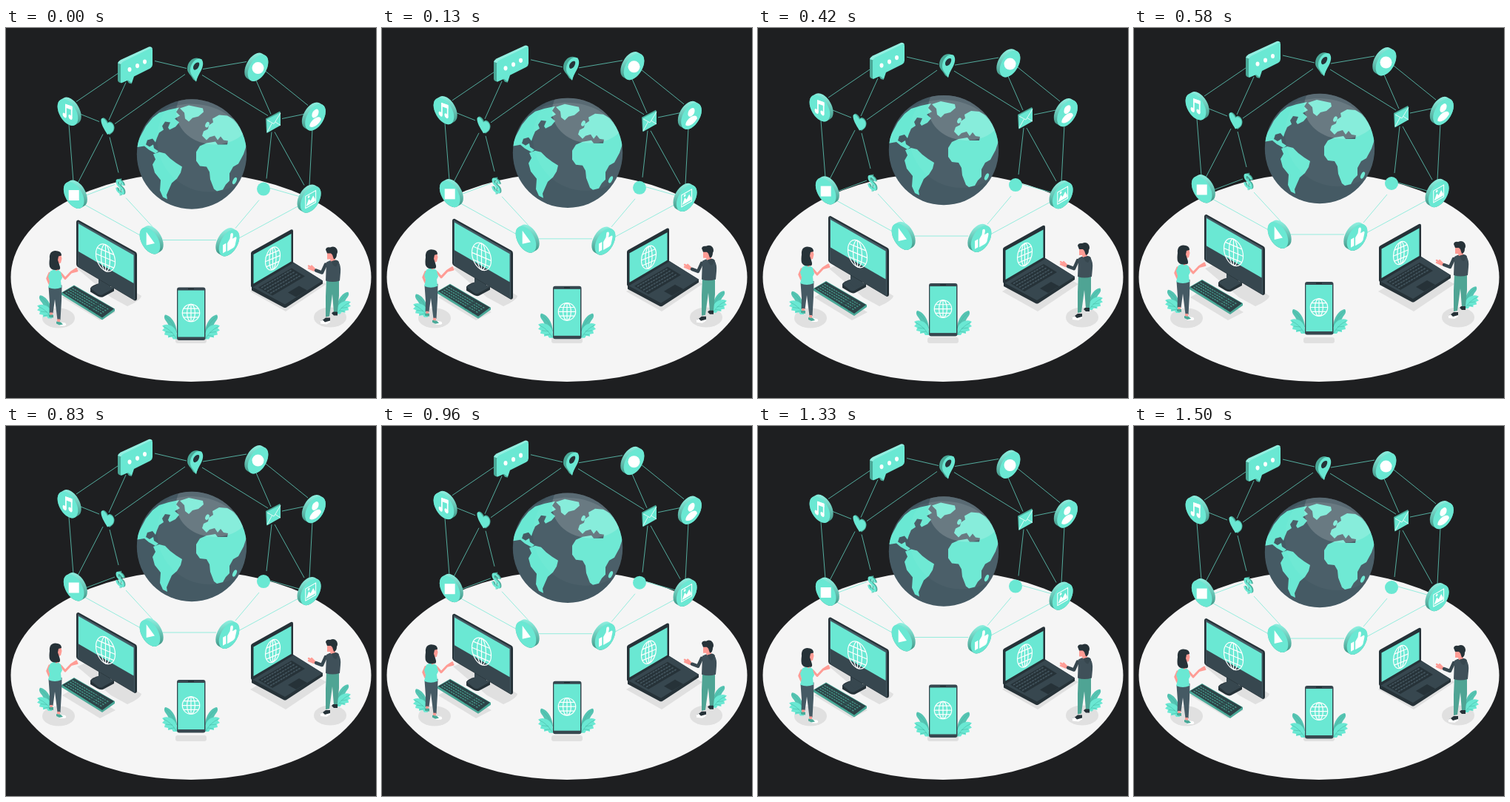
These frames come from a looping animation (500 px wide and 500 px high, 1540 ms). An HTML page:

```html
<!DOCTYPE html>
<html lang="en">
<head>
<meta charset="utf-8">
<title>Connected world</title>
<style>
  html, body { margin: 0; height: 100%; overflow: hidden; background: #1e1f21; }
  svg { display: block; width: 100vw; height: 100vh; }
  .teal { fill: #6ae8d3; }
  .shade { fill: #4aa998; }
  .slate { fill: #455a64; }
  .dark { fill: #37474f; }
  .ink { fill: #263238; }
  .skin { fill: #ff9c95; }
  .white { fill: #fff; }
  .shadow { fill: #e0e0e0; }
  .line { fill: none; stroke: #6ae8d3; stroke-width: .7; }
  .pen { fill: none; stroke: #fff; stroke-width: 1.2; stroke-linejoin: round; }
  #web * { vector-effect: non-scaling-stroke; }
  .vein { fill: none; stroke: #3fae9c; stroke-width: .5; }
  .limb { fill: none; stroke-linecap: round; stroke-linejoin: round; }
</style>
</head>
<body>
<svg viewBox="0 0 500 500">
  <defs>
    <linearGradient id="rim" gradientUnits="userSpaceOnUse" x1="0" y1="-20" x2="-8" y2="8">
      <stop stop-color="#8cefdf"/><stop offset="1" stop-color="#469c8d"/>
    </linearGradient>
    <clipPath id="earth"><circle cx="251" cy="170" r="74.2"/></clipPath>
    <g id="coin">
      <path d="M0 0L-5-5" stroke="url(#rim)" stroke-width="32" stroke-linecap="round"/>
      <circle class="teal" r="16"/>
    </g>
    <g id="web" class="pen">
      <circle r="10"/><ellipse rx="4.6" ry="10"/>
      <path d="M0-10V10M-10 0H10M-8.600-5H8.600M-8.600 5H8.600"/>
    </g>
    <g id="plant">
      <path fill="#55c4b2" d="M0-8C0-19 7-32 16-33C19-29 15-25 13-22C10-15 4-13 0-8Z"/>
      <path class="vein" d="M1-10Q6-24 16-31"/>
      <path class="teal" d="M0 0C-1-10 3-17 10-19Q16-21 20-18L17-15L20-12L16-10L17-6L12-5V-2L7-3L5 0Z"/>
      <path class="vein" d="M1-1Q7-12 18-17M6-9L15-10M4-5L11-4"/>
    </g>
  </defs>

  <ellipse cx="250" cy="336.700" rx="243.500" ry="141.200" fill="#f5f5f5"/>
  <g class="shadow">
    <ellipse cx="71" cy="392" rx="22" ry="13.500"/>
    <ellipse cx="438" cy="391" rx="22" ry="13.500"/>
    <rect x="229" y="418" width="42" height="8" rx="3"/>
    <path d="M96 325L113 318L183 362Q182 368 164 376L142 364Z"/>
    <path d="M76 364L94 353L148 384L127 395Z"/>
    <path d="M330 356L390 321L433 346L378 383Z"/>
  </g>

  <g id="float">
    <path class="line" d="M151 61L95 99M162 73L139 124M201 44L244 54M266 55L325 45M242 62L147 129
      M265 63L354 118M351 58L408 104M337 68L358 116M373 122L402 116M359 140L352 203M363 140L403 212
      M414 136L410 212M101 116L126 126M85 130L91 207M131 143L97 209M140 147L152 195M107 226L147 211
      M106 238L182 280M162 229L198 268M212 286H284M310 270L342 232M312 285L397 239M357 216L396 227"/>

    <!-- Earth -->
    <g clip-path="url(#earth)">
      <circle class="slate" cx="251" cy="170" r="75"/>
      <g class="teal">
        <path d="M175 161L181 147L189 132L198 121L207 114L220 110L234 107L230 113L235 118L228 122L234 127L229 133L221 137L219 134L222 127L215 126L211 132L213 137L207 141L204 148L202 154L198 149L191 151L189 157L194 160L199 157L200 162L206 166L202 169L193 164L187 159Z"/>
        <path d="M235 108L247 104L266 108L267 113L260 119L252 121L247 126L242 122L241 114Z"/>
        <path d="M199 170L207 167L215 169L222 176L230 182L238 187L236 195L231 203L224 209L220 218L217 225L218 231L212 228L208 219L209 205L201 195L198 184L202 177Z"/>
        <path d="M265 145L267 139L273 136L274 131L280 127L279 122L288 117L299 118L308 123L317 132L328 150L325 158L321 170L314 183L307 187L302 196L302 206L297 211L293 218L285 220L281 217L276 204L275 194L271 187L262 186L257 179L257 167L262 159L271 155L283 153L286 157L299 157L300 152L294 151L290 146L286 151L282 145L275 147L271 151Z"/>
        <ellipse cx="309" cy="206" rx="2.400" ry="5" transform="rotate(25 309 206)"/>
        <ellipse cx="272" cy="130" rx="2.500" ry="4" transform="rotate(25 272 130)"/>
      </g>
      <circle class="white" cx="275" cy="150" r="71" opacity=".03"/>
      <ellipse class="white" cx="282" cy="113" rx="52" ry="44" opacity=".17"/>
      <path class="dark" d="M177 96H330V170Q316 102 246 102Q204 106 177 130Z" opacity=".3"/>
    </g>

    <!-- Chat bubble -->
    <path class="shade" d="M151 48Q151 45 154 44L158 48L156 74L153 73Q151 72 151 70Z"/>
    <path fill="#93efe1" d="M151 47Q152 44 155 42.500L193 25Q196 24 198 27L157 49Z"/>
    <path class="shade" d="M162 68L166 74L170 75L168 66Z"/>
    <path class="teal" d="M155 50Q155 47 158 45L194 27.500Q198 25.500 198 29V49Q198 52 195 54L173 65L170 74L165 70L158 73Q155 75 155 72Z"/>
    <g class="white">
      <ellipse cx="167" cy="55.500" rx="2.500" ry="3.100"/><ellipse cx="177.500" cy="50.500" rx="2.500" ry="3.100"/><ellipse cx="187.500" cy="45" rx="2.500" ry="3.100"/>
    </g>

    <!-- Map pin -->
    <path class="shade" d="M245 55C245 46 251 40 258 40L265 42L257 72L253 69C250 63 245 60 245 55Z"/>
    <path class="teal" d="M249 57C249 49 254 42 260 41C265 40 267 45 266 50C265 57 259 63 257 72C254 66 249 63 249 57Z"/>
    <path class="ink" d="M253 53C253 57 256 57 259 54C262 50 262 45 259 46C256 46 253 50 253 53Z"/>

    <!-- Heart and envelope -->
    <g transform="matrix(.95 .5 0 1.050 137 134)">
      <path class="shade" d="M2 9C-4 4-9 0-9-5C-9-10-3-11 0-6C3-11 9-9 9-4C9 1 6 5 2 9Z" transform="translate(1 -1)"/>
      <path class="teal" d="M0 9C-5 4-9 0-9-5C-9-10-3-10 0-5C3-10 9-9 9-4C9 1 5 5 0 9Z"/>
    </g>
    <path class="shade" d="M351 122L370 112L371 114L353 141L352 140Z"/>
    <path class="teal" d="M352.500 123L371 113.500V131L352.500 141.500Z"/>
    <path class="pen" style="stroke-width:.8" d="M353 124L362 129L371 114.500M353 140L359.500 128M371 131L364 126.500"/>

    <!-- Dollar sign and round badge -->
    <g font-family="Liberation Sans, Arial, sans-serif" font-weight="700" font-size="28" text-anchor="middle">
      <text class="shade" transform="matrix(.8 .45 0 1 155.500 223.500)">$</text>
      <text class="teal" transform="matrix(.8 .45 0 1 154 224)">$</text>
    </g>
    <circle class="teal" cx="348" cy="217" r="9"/>

    <!-- Coins facing left -->
    <use href="#coin" transform="matrix(-.866 -.5 0 1 83.500 113.500)"/>
    <g transform="matrix(.866 .5 0 1 83.500 113)">
      <path class="pen" style="stroke-width:2" d="M-3 7V-8L6-10V5"/>
      <path class="white" d="M-4-9L7-11V-6L-4-4Z"/>
      <circle class="white" cx="-5" cy="7" r="3"/><circle class="white" cx="4" cy="5" r="3"/>
    </g>
    <use href="#coin" transform="matrix(-.866 -.5 0 1 91.700 225.500)"/>
    <rect class="white" x="-7" y="-7" width="14" height="14" transform="translate(91.700 225.500)"/>
    <use href="#coin" transform="matrix(-.866 -.5 0 1 194.500 287)"/>
    <path class="white" d="M-5-9V9L8 0Z" transform="matrix(.866 .5 0 1 194 286.500)"/>

    <!-- Coins facing right -->
    <use href="#coin" transform="matrix(.866 -.5 0 1 340.500 53.500)"/>
    <circle class="white" cx="340.500" cy="53.500" r="8"/>
    <use href="#coin" transform="matrix(.866 -.5 0 1 418 120.300)"/>
    <g class="white" transform="matrix(.866 -.5 0 1 418 120)">
      <circle cy="-5" r="5.300"/>
      <path d="M-9 8C-9-1 9-1 9 8Q5 12 0 12Q-5 12-9 8Z"/>
    </g>
    <use href="#coin" transform="matrix(.866 -.5 0 1 411.700 231.300)"/>
    <g transform="matrix(.866 -.5 0 1 411.700 231)">
      <rect class="pen" x="-8" y="-8" width="16" height="16"/>
      <path class="white" d="M-7 6L-3-2L0 2L4-3L7 3V6Z"/><circle class="white" cx="-3" cy="-5" r="1.600"/>
    </g>
    <use href="#coin" transform="matrix(.866 -.5 0 1 301.500 290)"/>
    <path class="white" d="M-10-2H-5V9H-10ZM-3-1L1-5L2-11Q6-12 6-7L5-3H10Q12-2 11 1L9 8Q8 10 6 10H-3Z" transform="matrix(.866 -.5 0 1 301.700 289.700)"/>

    <!-- Desktop computer -->
    <path class="ink" d="M114 351Q116 347 128 344L146 351V355L131 363Q128 364 124 362L114 356Z"/>
    <path class="dark" d="M114 351L127 344L146 351L130 360Q127 361 124 359Z"/>
    <path class="dark" d="M125 334L141 342V351L130 355L125 350Z"/>
    <path class="ink" d="M95 262Q95 259 98 259L175 302Q177 303 177 306V365Q177 368 174 368L98 323Q95 321 95 319Z"/>
    <path class="slate" d="M97 261L174 304V367L98 322L97 319Z"/>
    <path class="dark" d="M97 300L173 343V367L98 322Z"/>
    <path class="teal" d="M98 264L172.500 306.500V344.500L98 301.500Z"/>
    <use href="#web" transform="matrix(1.300 .55 0 1.780 134.500 310)"/>

    <!-- Keyboard -->
    <path class="shade" d="M75 357L92 347L147 379V382L130 394L75 360Z"/>
    <path fill="#2d4347" d="M76 357L92 348L146 379L130 391Z"/>
    <path d="M80.500 357L130 386M83.500 355L133 384M86.500 353L136 382M89.500 351L139 380" stroke="#429486" stroke-width="1.400" stroke-dasharray="2.600 1"/>
    <path d="M112 380L128 370M122 386L138 376" stroke="#2d4347" stroke-width="1.300"/>

    <!-- Laptop -->
    <path class="ink" d="M332 349L388 316L428 341V345L379 377Q377 378 375 377L332 354Z"/>
    <path class="dark" d="M332 349L388 316L428 341L377 373Z"/>
    <path class="ink" d="M331 304Q331 302 333 301L385 272Q388 271 388 274V317L333 350Q331 350 331 348Z"/>
    <path class="teal" d="M334.500 305.500L385.500 277.500V315L334.500 345Z"/>
    <use href="#web" transform="matrix(1 -.42 0 1.500 360.500 311)"/>
    <path class="ink" d="M341 350L386 324L404 335L360 361Z"/>
    <path d="M345 350.500L386 326.500M349 353L390 329M353 355.500L394 331.500M357 358L398 334" stroke="#42545d" stroke-width="1.700" stroke-dasharray="3 1"/>
    <path class="ink" d="M381 357L396 348L407 354L392 363Z"/>

    <!-- Phone -->
    <use href="#plant" transform="translate(269 420)"/>
    <use href="#plant" transform="translate(231 420) scale(-1 1)"/>
    <rect class="dark" x="231" y="350" width="38.500" height="71.500" rx="3"/>
    <rect class="teal" x="232.300" y="354" width="35.700" height="63"/>
    <path d="M246 352H254" stroke="#1c262b" stroke-width="1.200"/>
    <use href="#web" transform="translate(250 384.500) scale(1.170)"/>

    <!-- Woman -->
    <use href="#plant" transform="translate(62 392) scale(-1 .95)"/>
    <path class="limb" d="M59 331L56 338L59 345" stroke="#ff9c95" stroke-width="3.500"/>
    <path class="slate" d="M57.500 349L75.500 347L75 368L73.500 394H69.500L66 366L63.500 385H58.500L59 370Z"/>
    <path class="skin" d="M59 384H63V388H59ZM69 393H73V398H69Z"/>
    <path class="shade" d="M58 387L64 387L64 391L58 390Z"/>
    <path class="white" d="M68 396L73 397L80 398Q83 401 79 402L73 402L68 399Z"/>
    <path class="shade" d="M68 396L74 397L77 400L72 401L68 399Z"/>
    <path class="limb" d="M74 331L80 338L88 329.500L95 325M88 329.500L96 327.500" stroke="#ff9c95" stroke-width="3"/>
    <path class="teal" d="M60 328Q68 323 74 329L76 337L74 341L75 350Q66 354 57 350L59 342L57 335Z"/>
    <path class="skin" d="M68 305H74L75.500 311L74 317L71 318L72 326L67 328Z"/>
    <path class="ink" d="M59 311C58 302 64 299 70 301Q75 302 75 307L71 308L70 313L72 319Q75 327 70 326Q62 328 59 322Q58 318 59 311Z"/>

    <!-- Man -->
    <use href="#plant" transform="translate(447 386) scale(.95 .9)"/>
    <path class="limb" d="M418 326L413 321M417 326L409 321M416 327L409 324" stroke="#ff9c95" stroke-width="2.400"/>
    <path fill="#4fa494" d="M433 339L450 338L450 361L448 383L443 384L441 359L437 389L432 390L432 362Z"/>
    <path class="ink" d="M432 391L438 391V396L433 399L425 398Q423 396 428 394ZM442 383L448 383V388L443 388L440 385Z"/>
    <path class="white" d="M424 396L428 394L431 397L438 395V397L433 400L425 399Z"/>
    <path class="limb" d="M432 319L427 330L419 327" stroke="#37474f" stroke-width="4.500"/>
    <path fill="#3f5059" d="M433 316Q440 311 449 315Q453 321 452 330L451 341Q441 344 432 341Z"/>
    <path class="dark" d="M440 314Q448 311 450 316L446 322Q441 321 440 314Z"/>
    <path class="skin" d="M434 303L444 302L445 313L439 315L438 312L434 312Z"/>
    <path class="ink" d="M432 299Q433 295 438 296Q444 293 447 298Q449 302 447 305Q447 311 443 312L441 306L439 304L434 304Z"/>
  </g>
</svg>
<script>
  const LOOP = 1540, LOWEST = 1475, TRAVEL = 10, START = 8.6;
  const scene = document.getElementById("float");

  // Everything above the floor rises and sinks at constant speed.
  function draw(now) {
    const phase = ((now - LOWEST + LOOP) % LOOP + LOOP) % LOOP / LOOP;
    const height = TRAVEL * Math.abs(1 - 2 * phase) - START;
    scene.setAttribute("transform", `translate(0 ${height.toFixed(2)})`);
    requestAnimationFrame(() => draw(performance.now()));
  }
  draw(0);
</script>
</body>
</html>
```
